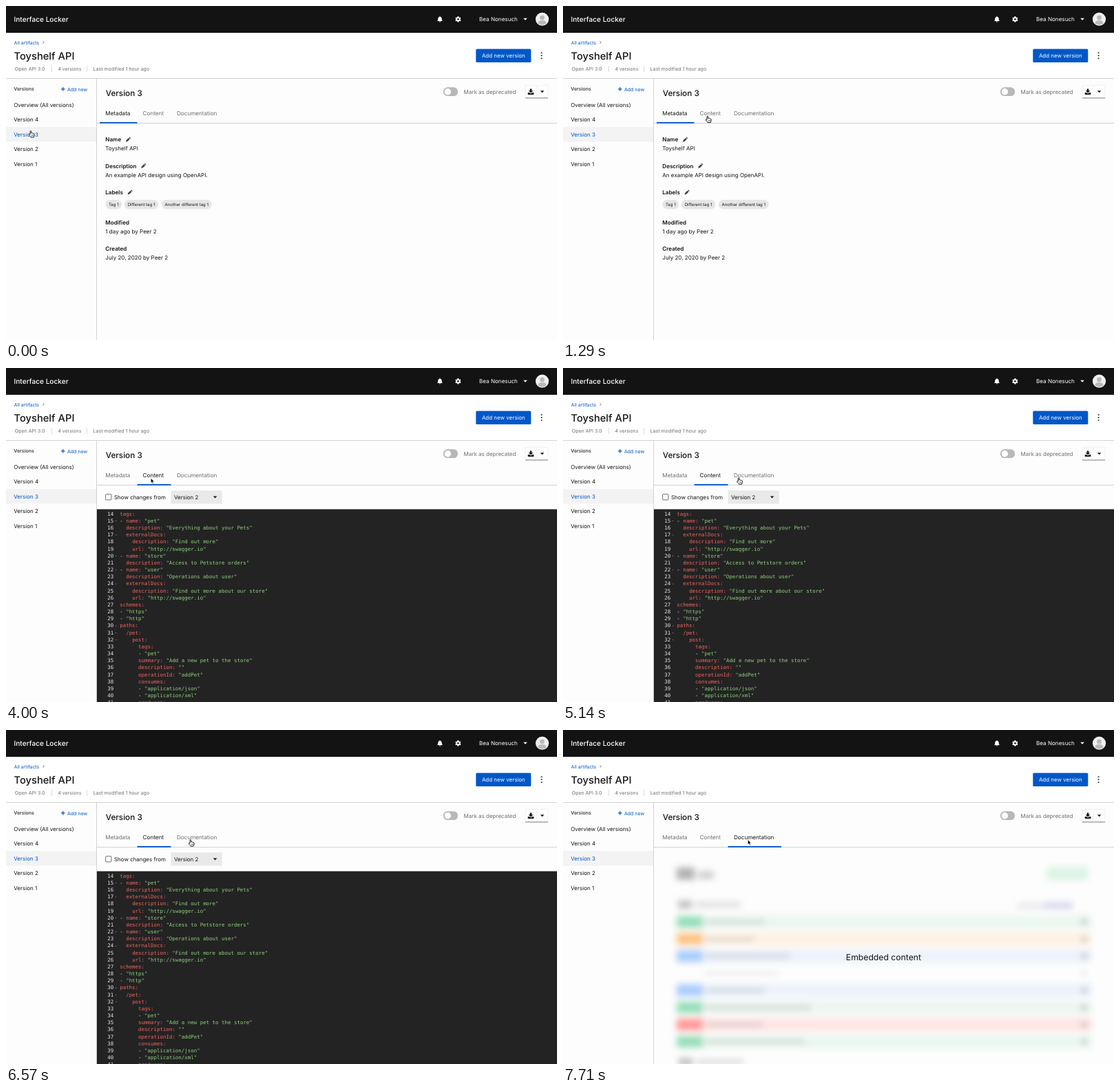
These frames come from a looping animation (800 by 486 pixels, 8000 ms). An HTML page:

```html
<!DOCTYPE html>
<html lang="en">
<head>
<meta charset="utf-8">
<title>Artifact versions</title>
<style>
  html, body { margin: 0; width: 100%; height: 100%; overflow: hidden; background: #fdfdfd; }
  svg { display: block; width: 800px; height: 486px; }
  text { font-family: Inter, "Open Sans", sans-serif; font-size: 8px; fill: #151515; text-rendering: geometricPrecision; }
  .code text { font-family: "DejaVu Sans Mono", monospace; font-size: 7.45px; fill: #e8e8e8; }
  .key { fill: #ee6460; }
  .str { fill: #8fd07f; }
</style>
</head>
<body>
<svg id="stage" viewBox="0 0 800 486"></svg>
<script>
const BLUE = '#0057c8', INK = '#151515', GREY = '#6a6e73', LINE = '#d2d2d2';

const text = (x, y, s, size = 8, fill = INK, weight = 400, anchor = 'start') =>
  `<text x="${x}" y="${y}" text-anchor="${anchor}" style="font-size:${size}px;fill:${fill};font-weight:${weight}">${s}</text>`;
const rect = (x, y, w, h, fill, r = 0, extra = '') =>
  `<rect x="${x}" y="${y}" width="${w}" height="${h}" rx="${r}" fill="${fill}" ${extra}/>`;
const circle = (x, y, r, fill) => `<circle cx="${x}" cy="${y}" r="${r}" fill="${fill}"/>`;
const path = (d, fill, extra = '') => `<path d="${d}" fill="${fill}" ${extra}/>`;
const at = (x, y, s, extra = '') => `<g transform="translate(${x} ${y}) ${extra}">${s}</g>`;
const caret = (x, y, fill = INK) => path(`M${x - 2.8} ${y - 1.5}h5.6l-2.8 3.1z`, fill);
const pencil = (x, y) => at(x, y,
  path('M-1.3 -3.6H1.3V-2.4H-1.3zM-1.3 -1.7H1.3V3L0 5.2L-1.3 3z', '#3c3f42'), 'rotate(45)');

function header() {
  const bell = path('M0 -4.3C.5 -4.3 .6 -3.9 .6 -3.5C2.3 -3.1 2.8 -1.8 2.8 0C2.8 1.3 3.3 1.8 3.8 2.6H-3.8C-3.3 1.8 -2.8 1.3 -2.8 0C-2.8 -1.8 -2.3 -3.1 -.6 -3.5C-.6 -3.9 -.5 -4.3 0 -4.3zM-1.1 3.2H1.1A1.1 1.1 0 0 1 -1.1 3.2z', '#fff');
  let gear = '';
  for (let a = 0; a < 180; a += 60) gear += rect(-1, -4.2, 2, 8.4, '#fff', .4, `transform="rotate(${a})"`);
  gear += circle(0, 0, 3.1, '#fff') + circle(0, 0, 1.3, INK);
  const avatar = circle(0, 0, 9.6, '#f0f0f0') + circle(0, -2.3, 3.4, '#b8bbbe') +
    path('M-6 6.2C-6 2.8 -3.6 1.7 0 1.7S6 2.8 6 6.2Q3.5 8.3 0 8.3T-6 6.2z', '#b8bbbe');
  return rect(0, 0, 800, 39, '#131313') + text(11.5, 23, 'Interface Locker', 10.15, '#fff', 500) +
    at(630, 19.3, bell) + at(656.4, 19.3, gear) + text(687, 22.2, 'Bea Nonesuch', 8.1, '#fff') +
    caret(754, 19.2, '#fff') + at(778.5, 19.2, avatar);
}

function titleBar() {
  return text(11.8, 55.6, 'All artifacts', 6.85, BLUE) +
    path('M53.6 51.2l1.7 1.8l-1.7 1.8', 'none', `stroke="${GREY}" stroke-width=".9"`) +
    text(11.5, 77.7, 'Toyshelf API', 14.7, INK, 500) +
    text(12.8, 93.9, 'Open API 3.0', 7.05, GREY) + text(75.4, 93.9, '4 versions', 6.9, GREY) +
    text(126.5, 93.9, 'Last modified 1 hour ago', 7.05, GREY) +
    rect(66.2, 87, .8, 9, LINE) + rect(117, 87, .8, 9, LINE) +
    rect(682.3, 62.4, 80, 19.6, BLUE, 1.6) + text(722.3, 75, 'Add new version', 7.95, '#fff', 400, 'middle') +
    [68.2, 72.2, 76.2].map(y => circle(777.6, y, 1.1, '#4a4d50')).join('') +
    rect(0, 105, 800, 1, LINE);
}

function sidebar() {
  const items = ['Overview (All versions)', 'Version 4', 'Version 3', 'Version 2', 'Version 1'];
  return rect(0, 176, 131, 21.4, '#f3f3f3') + rect(131, 105, 1, 381, LINE) +
    text(11.2, 123.4, 'Versions', 7, '#3c3f42', 600) + text(89, 123.6, 'Add new', 7, BLUE) +
    path('M80 120.9h5.6M82.8 118.1v5.6', 'none', `stroke="${BLUE}" stroke-width="1.2"`) +
    items.map((s, i) => text(11.2, 146.7 + i * 21.45, s, 8, i === 2 ? BLUE : INK)).join('');
}

function versionBar() {
  return text(144.7, 130.5, 'Version 3', 11.75, INK, 500) +
    rect(634.8, 118.3, 21.4, 12.8, '#b8b8b8', 6.4) + circle(641.4, 124.7, 4.7, '#fff') +
    text(664.6, 127.6, 'Mark as deprecated', 8, GREY) +
    rect(754.2, 115.3, 32.6, 18.6, '#fff', 0, 'stroke="#ececec" stroke-width=".7"') +
    rect(754, 133.5, 33, .9, GREY) + rect(770, 115.5, .6, 18, '#ececec') +
    path('M760.7 120.6h2.6v2.7h2l-3.3 3.3l-3.3 -3.3h2zM757.7 125.9h2.2l2.1 1.7l2.1 -1.7h2.2v3.2h-8.6z', INK) +
    caret(778.6, 124.7) + rect(132, 170, 668, 1, LINE);
}

const tabs = [['Metadata', 144.3, 136, 54.5], ['Content', 198.6, 190.5, 49], ['Documentation', 248, 239.5, 77.5]];
const tabRow = active => tabs.map(([s, x, left, w], i) =>
  text(x, 158.5, s, 8.15, i === active ? INK : GREY) +
  (i === active ? rect(left, 168.9, w, 1.9, BLUE) : '')).join('');

function metadata() {
  const fields = [['Name', 197, 'Toyshelf API'], ['Description', 235.6, 'An example API design using OpenAPI.'],
    ['Labels', 274], ['Modified', 317.9, '1 day ago by Peer 2'], ['Created', 356.4, 'July 20, 2020 by Peer 2']];
  const tags = [[144.5, 23.5, 'Tag 1'], [171.8, 49.5, 'Different tag 1'], [225.8, 73, 'Another different tag 1']];
  return fields.map(([name, y, value]) => text(144.3, y, name, 8.1, INK, 600) +
      (value ? text(144.3, y + 12.9, value, 8.05) : '')).join('') +
    pencil(177.7, 194) + pencil(200, 232.3) + pencil(180.3, 270.8) +
    tags.map(([x, w, s]) => rect(x, 282, w, 13.4, '#e6e6e6', 6.7) +
      text(x + w / 2, 290.9, s, 6.05, INK, 400, 'middle')).join('');
}

const yaml = `tags:
- name: "pet"
  description: "Everything about your Pets"
  externalDocs:
    description: "Find out more"
    url: "http://swagger.io"
- name: "store"
  description: "Access to Petstore orders"
- name: "user"
  description: "Operations about user"
  externalDocs:
    description: "Find out more about our store"
    url: "http://swagger.io"
schemes:
- "https"
- "http"
paths:
  /pet:
    post:
      tags:
      - "pet"
      summary: "Add a new pet to the store"
      description: ""
      operationId: "addPet"
      consumes:
      - "application/json"
      - "application/xml"
      produces:`.split('\n');
const folds = [15, 17, 20, 22, 24, 30, 31, 32];

function content() {
  const lines = yaml.map((line, i) => {
    const n = i + 14, y = 214.7 + i * 10.17, indent = line.search(/\S/);
    const marked = line.trim().replace(/(".*")|([\w/]+)(?=:)/g, (m, str) =>
      `<tspan class="${str ? 'str' : 'key'}">${m}</tspan>`).replace(/(<\/tspan>):/, '<tspan class="key">:</tspan>$1');
    return `<text x="156.2" y="${y}" text-anchor="end">${n}</text>` +
      (folds.includes(n) ? rect(158.6, y - 2.6, 2, .7, '#8a8a8a') : '') +
      `<text x="${165.2 + indent * 4.485}" y="${y}">${marked}</text>`;
  });
  return rect(144.7, 183.7, 8.2, 8.2, '#fff', .8, 'stroke="#5a5d60" stroke-width=".9"') +
    text(157, 190.6, 'Show changes from', 7.95) +
    rect(239.5, 178.3, 74.2, 19.2, '#e9e9e9') + text(244, 190.6, 'Version 2', 7.95) + caret(303.6, 187.9) +
    rect(132, 205.5, 668, 281, '#232323') + `<g class="code">${lines.join('')}</g>`;
}

function documentation() {
  const tint = { g: ['#98dfbb', '#ecf7f1'], o: ['#fdc583', '#fef2e4'], b: ['#a9cdfd', '#ecf3fb'], r: ['#ff9a98', '#fee6e4'] };
  const rows = [['g', 293], ['o', 278], ['b', 330], ['', 312], ['b', 293], ['g', 360], ['r', 290], ['g', 352]];
  const soft = rows.map(([key, end], i) => {
    const y = 279.2 + i * 24.9;
    const words = rect(207, y - 3, end - 207, 6, '#777', 0, `opacity="${key ? .24 : .13}"`);
    if (!key) return words + rect(752, y - 2, 9, 4, '#ddd');
    const [strong, pale] = tint[key];
    return rect(165, y - 10.5, 603, 21, pale) + rect(165, y - 8.5, 38, 17, strong) + words +
      rect(752, y - 4, 9, 8, '#777', 0, 'opacity=".35"');
  }).join('');
  return `<g filter="url(#soft)">${rect(165, 200, 26, 18, '#b2b2b2')}${rect(196, 205, 23, 12, '#d0d0d0')}` +
    rect(702, 199, 61, 20, '#dcf4e5', 4) + rect(167, 248, 20, 12, '#c2c2c2') + rect(192, 250, 66, 8, '#dedede') +
    rect(660, 252, 40, 8, '#e6e6ee') + rect(700, 251, 40, 9, '#d5d5ee') + soft +
    rect(168, 477, 20, 12, '#c2c2c2') + rect(193, 479, 69, 8, '#dedede') + '</g>' +
    text(465.4, 335, 'Embedded content', 12.2, INK, 400, 'middle');
}

const arrow = path('M0 0V7.2L1.7 5.7L2.8 8.3L4.1 7.7L3 5.2H5.2z', '#000', 'stroke="#fff" stroke-width=".7"');
const hand = path('M-1.2 5.4V.9C-1.2 -.2 .5 -.2 .5 .9V3.3C1 2.8 1.8 3 2 3.6C2.5 3.2 3.3 3.4 3.5 4C4.1 3.7 4.9 4 4.9 4.9V6.6C4.9 7.7 4.1 8.3 4.1 9.4H-.2C-.3 8.4 -2 7.2 -2.8 5.9C-3.2 5 -2.2 4.4 -1.2 5.4z',
  '#fff', 'stroke="#000" stroke-width=".9" stroke-linejoin="round"') +
  path('M.8 5.7v2M2.1 5.7v2M3.4 5.7v2', 'none', 'stroke="#000" stroke-width=".5"');

const stage = document.getElementById('stage');
stage.innerHTML = '<defs><filter id="soft" filterUnits="userSpaceOnUse" x="132" y="171" width="668" height="340"><feGaussianBlur stdDeviation="5"/></filter></defs>' +
  rect(0, 39, 800, 66, '#fff') + header() + titleBar() + sidebar() + versionBar() +
  [metadata, content, documentation].map((page, i) => `<g class="page">${tabRow(i)}${page()}</g>`).join('') +
  `<g id="cursor"><g>${arrow}</g><g>${hand}</g></g>`;

const pages = stage.querySelectorAll('.page');
const cursor = document.getElementById('cursor');
const [arrowEl, handEl] = cursor.children;
const show = (el, on) => el.style.display = on ? '' : 'none';
const clamp = v => Math.min(1, Math.max(0, v));
const smooth = p => p * p * (3 - 2 * p);
const easeOut = p => 1 - (1 - p) ** 1.5;

function draw(ms) {
  const tick = Math.floor((ms % 8000 + 5) * .007);
  const page = tick >= 47 ? 2 : tick >= 20 ? 1 : 0;
  const toContent = smooth(clamp((tick - 2) / 7));
  const toDocs = easeOut(clamp((tick - 29) / 11));
  const x = 36.2 + 174 * toContent + 58 * toDocs;
  const y = 181.6 - 21.4 * toContent - .6 * toDocs;
  const pointing = page === 0 ? x < 131 || x > 190 : page === 1 && x > 240;
  pages.forEach((el, i) => show(el, i === page));
  show(arrowEl, !pointing);
  show(handEl, pointing);
  cursor.setAttribute('transform', `translate(${x} ${y})`);
}

const start = performance.now();
function loop() {
  draw(performance.now() - start);
  requestAnimationFrame(loop);
}
loop();
</script>
</body>
</html>
```
